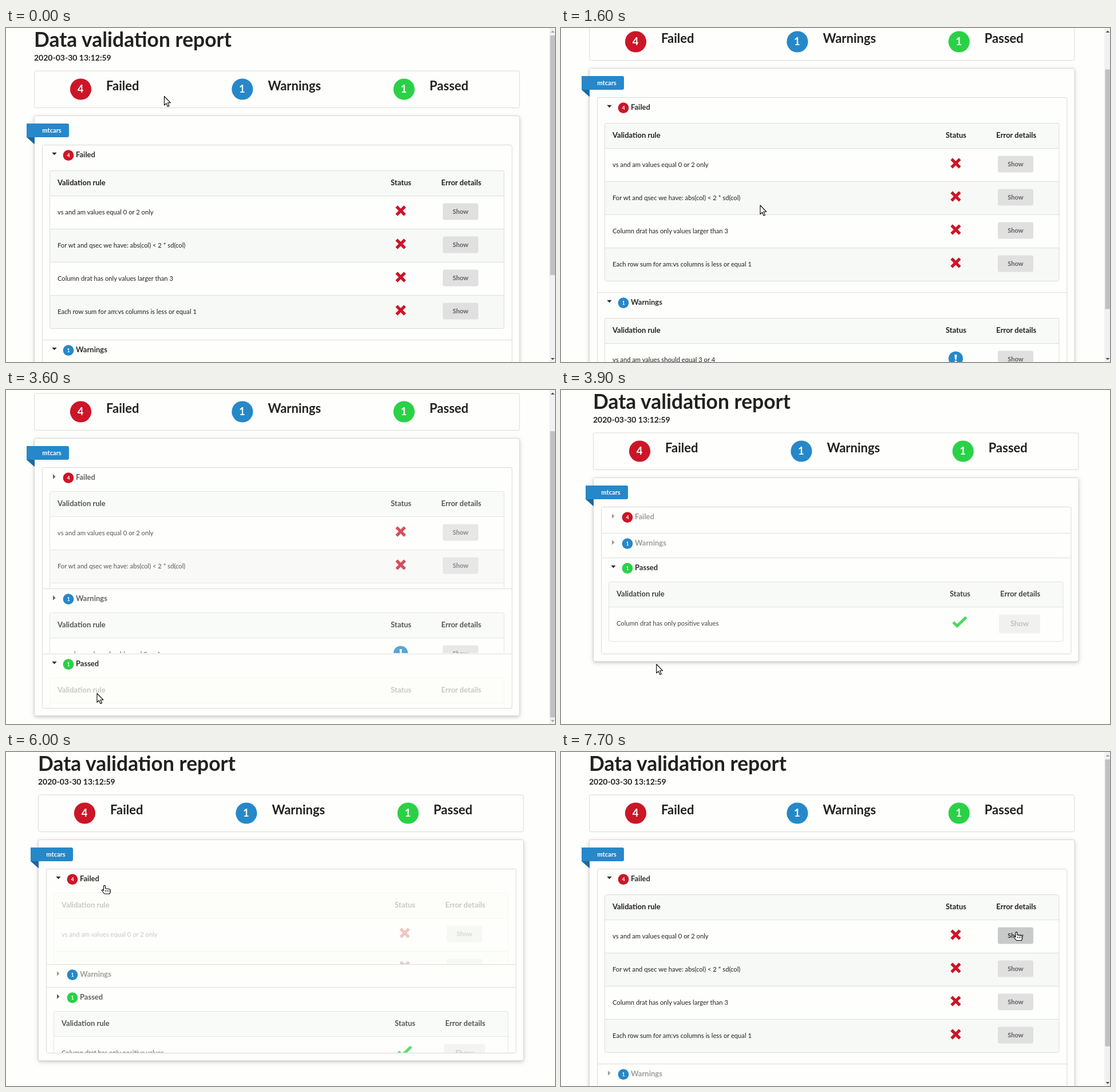
Animation, 959 px wide and 584 px high, one loop 8 s. Source, as an HTML page:

```html
<!DOCTYPE html>
<html lang="en">
<head>
<meta charset="utf-8">
<title>Data validation report</title>
<style>
  html, body { margin: 0; width: 100%; height: 100%; overflow: hidden; background: #fefffc; }
  #stage { display: block; font-family: Lato, "Open Sans", sans-serif; font-size: 13px; fill: #212121; }
  .b { font-weight: 700; }
  .mid { text-anchor: middle; }
  .row { font-size: 11.2px; }
  .box { fill: #fefffc; stroke: #d9dad8; }
  .line { stroke: #dedfdd; }
  .raised { filter: drop-shadow(0 2px 2px rgba(34,36,38,.12)) drop-shadow(0 2px 4px rgba(34,36,38,.13)); }
  .cross { stroke: #cb1628; stroke-width: 5.2; }
  .tick { stroke: #2ad147; stroke-width: 5; fill: none; }
  .btn rect { fill: #dfe0df; }
  .btn text { fill: #626262; font-size: 11.2px; }
  .btn.hover rect { fill: #c8c9c9; }
  .btn.hover text { fill: #333; }
  .btn.off { opacity: .45; }
  .btn.off text { font-size: 13px; }
  #cursor path { fill: #fff; stroke: #000; stroke-width: 1.1; stroke-linejoin: round; }
</style>
</head>
<body>
<svg id="stage" width="959" height="584" viewBox="0 0 959 584"></svg>
<script>
const RED = '#cb1628', BLUE = '#2688c9', GREEN = '#2ad147';
const CLOSED = 39.2, TOP = 204, VIEW = 584, TRACK = 560, HEAD = 44, ROW = 58;

const sections = [
  { name: 'Failed', count: 4, color: RED, extra: 302.3, icon: 'cross', rows: [
    'vs and am values equal 0 or 2 only',
    'For wt and qsec we have: abs(col) &lt; 2 * sd(col)',
    'Column drat has only values larger than 3',
    'Each row sum for am:vs columns is less or equal 1'] },
  { name: 'Warnings', count: 1, color: BLUE, extra: 128.8, icon: 'alert',
    rows: ['vs and am values should equal 3 or 4'] },
  { name: 'Passed', count: 1, color: GREEN, extra: 132, icon: 'tick',
    rows: ['Column drat has only positive values'] }
];

// Clicks on section titles; a click opens one section and closes the others
const clicks = [{ at: 3479, open: 2 }, { at: 5879, open: 0 }];

// Cursor waypoints: start and end of each glide, then where it leads
const glides = [
  [200, 600, 439, 325], [700, 1100, 347.5, 309.5], [2000, 2200, 195, 410],
  [2300, 2400, 189.5, 437], [2900, 3100, 161, 520], [3200, 3600, 158.5, 530],
  [3600, 4200, 174, 428], [4300, 5200, 171.5, 400], [5200, 5600, 172, 233],
  [6200, 6300, 176, 238.5], [6700, 7200, 700, 378], [7200, 7500, 784.5, 321.5],
  [7600, 7700, 795.5, 314.5]
];

const clamp = x => Math.max(0, Math.min(1, x));
const mix = (a, b, k) => a + (b - a) * k;
const ramp = (t, a, b) => { const x = clamp((t - a) / (b - a)); return x * x * (3 - 2 * x); };
const wheel = t => 105 * ramp(t, 1365, 1700) + 92 * ramp(t, 1900, 2000);
const pointer = t => glides.reduce(([x, y], [a, b, tx, ty]) => {
  const k = ramp(t, a, b);
  return [mix(x, tx, k), mix(y, ty, k)];
}, [276, 119]);

const text = (x, y, s, cls = '', more = '') => `<text x="${x}" y="${y}" class="${cls}" ${more}>${s}</text>`;
const rect = (x, y, w, h, more = '') => `<rect x="${x}" y="${y}" width="${w}" height="${h}" ${more}/>`;
const line = (x1, x2, y) => `<path class="line" d="M${x1} ${y}H${x2}"/>`;
const disc = (x, y, r, color) => `<circle cx="${x}" cy="${y}" r="${r}" fill="${color}"/>`;

const icons = {
  cross: '<path class="cross" d="M-7.3-7.3L7.3 7.3M7.3-7.3L-7.3 7.3"/>',
  alert: disc(0, .5, 12.6, BLUE) + '<path d="M-2-6.5H2L1.4 2.5H-1.4Z" fill="#fff"/>' + disc(0, 5.8, 2, '#fff'),
  tick: '<path class="tick" d="M-11.3 .5L-4.5 7L11.3-8.3"/>'
};

function button(y, off) {
  const [w, h] = off ? [72, 33] : [62, 29];
  return `<g class="btn ${off ? 'off' : ''}">` +
    rect(794 - w / 2, y - h / 2, w, h, 'rx="3"') +
    text(794, y + 3.8, 'Show', 'b mid') + '</g>';
}

function table({ rows, icon }) {
  const off = icon === 'tick', h = off ? 60 : ROW;
  const height = HEAD + h * rows.length;
  let s = rect(77, .5, 793, height, 'fill="#fefffc"') + rect(77, .5, 793, HEAD, 'fill="#f8faf7"') +
    text(90, 25.5, 'Validation rule', 'b') + text(690, 25.5, 'Status', 'b mid') +
    text(795.3, 25.5, 'Error details', 'b mid');
  rows.forEach((rule, i) => {
    const y = HEAD + h * i;
    if (i % 2) s += rect(77, y, 793, h, 'fill="#f7f9f6"');
    s += line(77, 870, y + .5) + text(90, y + 32.5, rule, 'row') +
      `<g transform="translate(689.5 ${y + 26.5})">${icons[icon]}</g>` +
      button(y + (off ? 30 : 28), off);
  });
  return s + rect(76.5, .5, 793.5, height, 'rx="3" fill="none" stroke="#dcdddb"');
}

function section(sec, i) {
  return '<g class="section">' + (i ? line(63, 884, .5) : '') +
    '<g class="title"><path class="arrow"/>' + text(122, 22, sec.name, 'b') + '</g>' +
    disc(109, 18.7, 9.4, sec.color) + text(109, 22, sec.count, 'b mid', 'fill="#fff" font-size="9"') +
    `<svg class="content" x="0" y="39" width="959"><g>${table(sec)}</g></svg></g>`;
}

const summary = sections.map((s, i) => {
  const x = 130.5 + 282.4 * i;
  return disc(x, 107, 18.6, s.color) +
    text(x - .5, 112.5, s.count, 'b mid', 'fill="#fff" font-size="18.5"') +
    text(x + 44.5, 109, s.name, 'b', 'font-size="22"');
}).join('');

const stage = document.getElementById('stage');
stage.innerHTML = '<g id="page">' +
  text(49, 33, 'Data validation report', 'b', 'font-size="35.4"') +
  text(49, 57, '2020-03-30 13:12:59', 'b', 'font-size="14"') +
  rect(49.5, 75, 847.5, 64.5, 'rx="3" class="box"') + summary +
  '<g class="raised">' + rect(49.5, 153.5, 847.5, 0, 'rx="3" class="box" id="panel"') + '</g>' +
  `<path d="M36 167H107Q110 167 110 170V188Q110 191 107 191H36Z" fill="${BLUE}"/>` +
  '<path d="M36 191H50V203.5Z" fill="#1c689f"/>' +
  text(80, 183, 'mtcars', 'b mid', 'style="fill:#fff;font-size:11.2px"') +
  rect(63.5, 204.5, 820.5, 0, 'rx="3" class="box" id="frame"') +
  sections.map(section).join('') + '</g>' +
  '<g id="bar">' + rect(949, 0, 10, VIEW, 'fill="#f1f1f1"') +
  rect(950.5, 13, 8.5, 0, 'fill="#c1c1c1" id="thumb"') +
  '<path id="up" d="M951.5 8H958.5L955 4.5Z"/><path id="down" d="M951.5 577H958.5L955 580.5Z"/></g>' +
  '<g id="cursor"><path/></g>';

const $ = s => stage.querySelector(s);
const $$ = s => [...stage.querySelectorAll(s)];
const [page, panel, frame, bar, thumb, up, down, cursor] =
  ['page', 'panel', 'frame', 'bar', 'thumb', 'up', 'down', 'cursor'].map(id => $('#' + id));
const groups = $$('.section').map(el => ({
  el, title: el.querySelector('.title'), arrow: el.querySelector('.arrow'),
  content: el.querySelector('.content'), table: el.querySelector('.content > g'),
  buttons: [...el.querySelectorAll('.btn:not(.off)')]
}));

const ARROW = 'M.5 .5V16L4 12.8L6.5 18.5L9 17.4L6.5 11.8H11.5Z';
const HAND = 'M-1.5 1.5Q0-.8 1.5 1.5V5.5L9 6.8Q10.5 7.2 10.5 9V11L9 15H0L-4.5 9.5Q-5 7.2-3 7.8L-1.5 9.3ZM2 8.5V11M5 8.5V11M8 8.5V11';

const set = (el, attrs) => { for (const k in attrs) el.setAttribute(k, attrs[k]); };
const isOpen = (i, n) => n ? clicks[n - 1].open === i : i < 2;
const inside = (x, y, left, right, mid, half) => x > left && x < right && Math.abs(y - mid) < half;

// Height, opacity and place of every section at time t
function layout(t) {
  const n = clicks.filter(c => c.at <= t).length;
  const x = n ? clamp((t - clicks[n - 1].at) / 500) : 1;
  const eased = 1 - (1 - x) ** 2;
  let y = TOP;
  const parts = sections.map((sec, i) => {
    const to = isOpen(i, n), from = n ? isOpen(i, n - 1) : to;
    const part = {
      y: Math.floor(y), to, moving: from !== to && x < 1,
      size: mix(from, to, eased) * sec.extra, opacity: mix(from, to, x),
      shade: to ? .95 : mix(from ? .95 : .44, .44, clamp(x * 2))
    };
    y += CLOSED + part.size;
    return part;
  });
  return { parts, bottom: y, total: y + 28 };
}

function draw(time) {
  const t = Math.floor(time / 100) * 100;
  const { parts, bottom, total } = layout(t);
  const room = Math.max(0, total - VIEW);
  const offset = Math.round(t < clicks[1].at ? Math.min(room, wheel(t)) : 0);
  const dx = room ? 0 : 7;
  const [cx, cy] = pointer(t), px = cx - dx, py = cy + offset;
  let hand = false;

  parts.forEach((p, i) => {
    const g = groups[i];
    const hover = inside(px, py, 64, 884, p.y + 20, 19.5);
    hand ||= hover;
    set(g.el, { transform: `translate(0 ${p.y})` });
    set(g.title, { opacity: hover ? .95 : p.shade });
    set(g.arrow, { d: p.to ? 'M80.3 13.8H88.7L84.5 18.3Z' : 'M82 12.3V20.7L86.5 16.5Z' });
    set(g.content, { height: p.size });
    set(g.table, { opacity: p.opacity, transform: `translate(0 ${p.moving ? 3 : 6})` });
    g.buttons.forEach((b, row) => {
      const over = p.to && inside(px, py, 763, 825, p.y + 117.5 + ROW * row, 14.5);
      hand ||= over;
      b.classList.toggle('hover', over);
    });
  });

  set(frame, { height: Math.round(bottom) - 204 });
  set(panel, { height: Math.round(bottom + 13) - 153 });
  set(page, { transform: `translate(${dx} ${-offset})` });
  set(bar, { visibility: room ? 'visible' : 'hidden' });
  set(thumb, { y: 13 + offset * TRACK / total, height: TRACK * VIEW / total });
  set(up, { fill: offset ? '#505050' : '#a3a3a3' });
  set(down, { fill: offset < room - 1 ? '#505050' : '#a3a3a3' });
  set(cursor, { transform: `translate(${cx} ${cy})` });
  set(cursor.firstChild, { d: hand ? HAND : ARROW });
}

function tick() {
  draw(performance.now() % 8000);
  requestAnimationFrame(tick);
}
tick();
</script>
</body>
</html>
```
